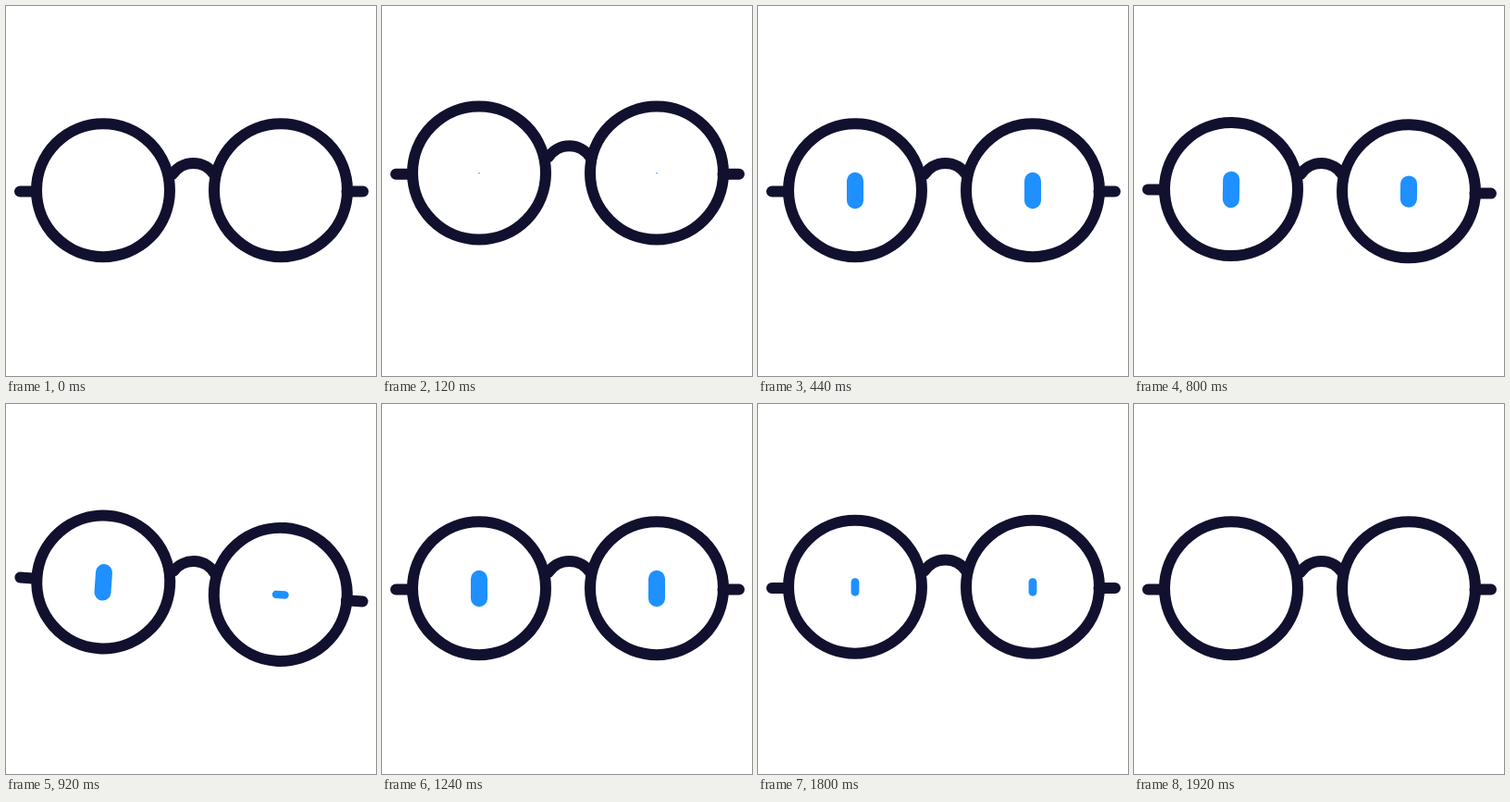
These frames come from a looping animation (400 px wide and 400 px high, 2 s). An HTML page:

```html
<!DOCTYPE html>
<html lang="en">
<head>
<meta charset="utf-8">
<title>Winking glasses</title>
<style>
  html, body { margin: 0; width: 100%; height: 100%; overflow: hidden; background: #fff; }
  svg { display: block; width: 100%; height: 100%; }
</style>
</head>
<body>
<svg viewBox="0 0 400 400">
  <g id="face">
    <g fill="none" stroke="#11112f" stroke-width="12" stroke-linecap="round">
      <circle cx="105" cy="199.2" r="72"/>
      <circle cx="297" cy="199.2" r="72"/>
      <path d="M15 200.5H32M368.5 200.5H386M180 182A27 27 0 0 1 225 182"/>
    </g>
    <g fill="#1e90ff">
      <rect id="left"/>
      <rect id="right"/>
    </g>
  </g>
</svg>
<script>
const LOOP = 2000;
const [face, left, right] = ['face', 'left', 'right'].map(id => document.getElementById(id));

// Keys are [ms, value] pairs
const lift = [[0, 0], [160, -22], [320, 12], [440, 0], [1640, 0], [1720, 12], [1840, -6], [1920, 0]];
const tilt = [[760, 0], [920, 4], [1080, 4], [1240, 0]];
const lid = [[760, 39.5], [920, 8.5], [1080, 8.5], [1240, 39.5]];
const size = [[100, 0], [260, 1], [1720, 1], [1880, 0]];

const ease = p => p * p * (3 - 2 * p);

function at(keys, t) {
  const i = keys.findIndex(k => k[0] > t);
  if (i < 0) return keys[keys.length - 1][1];
  if (i === 0) return keys[0][1];
  const [t0, a] = keys[i - 1], [t1, b] = keys[i];
  return a + (b - a) * ease((t - t0) / (t1 - t0));
}

function drawEye(eye, cx, w, h) {
  const box = { x: cx - w / 2, y: 199.5 - h / 2, width: w, height: h, rx: Math.min(w, h) / 2 };
  for (const name in box) eye.setAttribute(name, box[name]);
}

function draw(now) {
  const t = now % LOOP, s = at(size, t);
  face.setAttribute('transform', `translate(0 ${at(lift, t)}) rotate(${at(tilt, t)} 201 199.5)`);
  drawEye(left, 105, 18 * s, 39.5 * s);
  drawEye(right, 297, 18 * s, at(lid, t) * s);
}

const start = performance.now();
function tick() {
  draw(performance.now() - start);
  requestAnimationFrame(tick);
}
tick();
</script>
</body>
</html>
```
